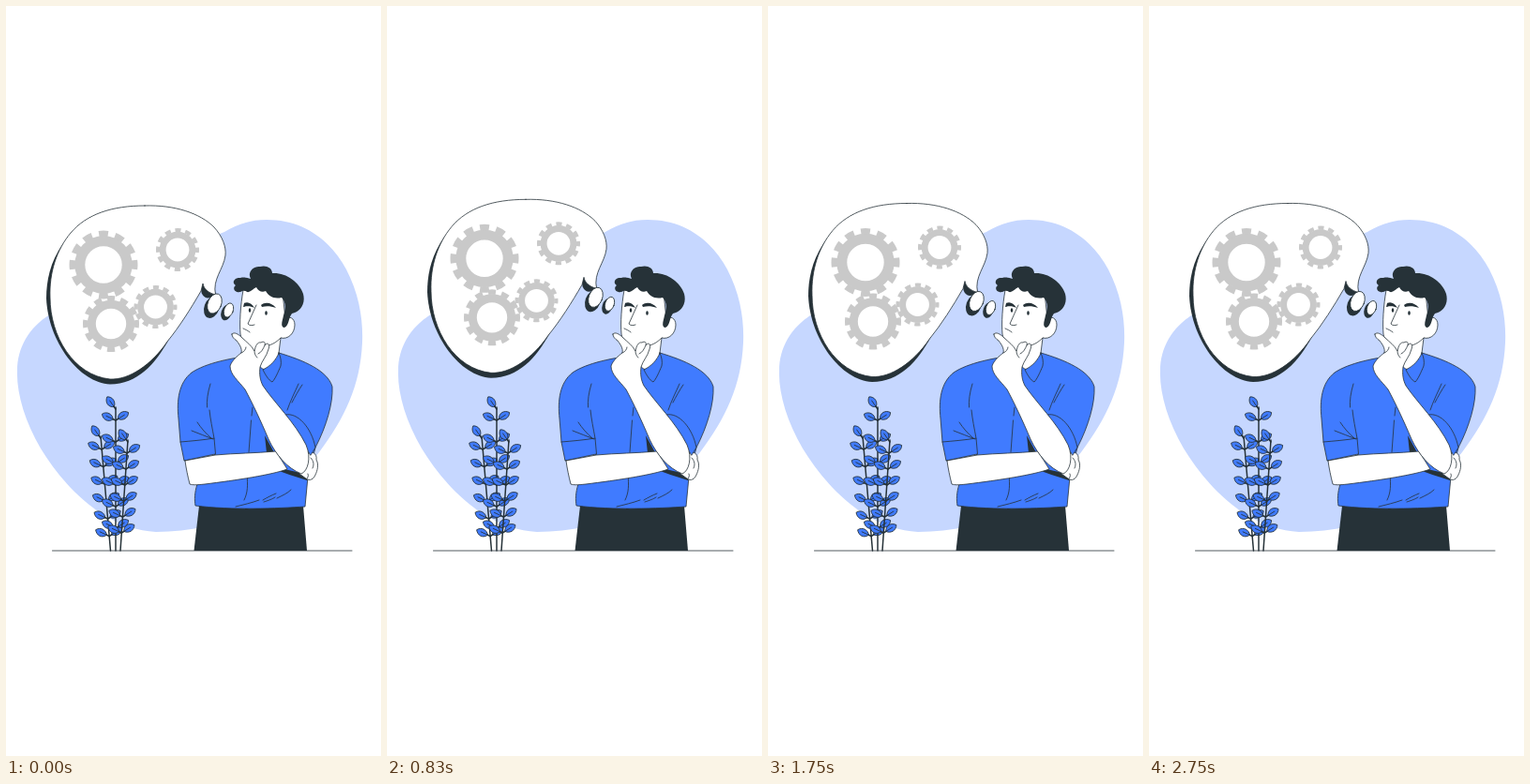
An HTML page for the animation above (2.79 s loop, 400 px wide and 800 px high).

```html
<!DOCTYPE html>
<html lang="en">
<head>
<meta charset="utf-8">
<title>Thinking</title>
<style>
  html, body { margin: 0; width: 100%; height: 100%; overflow: hidden; background: #fff; }
  svg { display: block; width: 100%; height: 100%; }
  .ink { fill: #263238; }
  .white { fill: #fff; }
  .blue { fill: #407bff; }
  .line { fill: none; }
  .white, .blue, .line { stroke: #263238; stroke-width: .8; stroke-linecap: round; stroke-linejoin: round; }
  .stem { stroke-width: 1.5; }
  #gear circle { fill: none; stroke: #c9c9c9; }
</style>
</head>
<body>
<svg viewBox="0 0 400 800">
  <defs>
    <g id="gear">
      <circle r="69" stroke-width="30"/>
      <circle r="91" stroke-width="18" pathLength="360" stroke-dasharray="17 13" stroke-dashoffset="8.5"/>
    </g>
  </defs>

  <path fill="#c6d7ff" d="M278 228C318 228 346 250 363 281C377 308 381 335 380 359C378 405 361 440 334 476C295 525 240 561 160 561C105 558 62 513 37 472C20 443 11 412 12 389C12 365 24 343 47 329C110 290 180 262 233 241C248 232 262 228 278 228Z"/>
  <path class="line" stroke-width="1" d="M49.500 581H369"/>
  <g id="plant"></g>

  <g id="thought">
    <path class="ink" d="M66 247C48 268 43 291 43 312C45 358 78 402 111 403.500C140 403 159 383 174 355L120 300Z"/>
    <path class="ink" d="M210 296C206 303 209 311 215 311.500C219 311.500 222 310 224 308L220 296Z"/>
    <path class="white" d="M148 213C180 212 207 221 222 236C231 246 235 257 234 266C232 281 220 291 223.500 308C216 306 211 302 210 296L208 304C197 323 185 342 172 358C155 383 131 399 111 398C72 394 47 352 47 311C46 284 54 260 69 242C86 222 113 213 148 213Z"/>
    <use href="#gear" transform="translate(104 276) scale(.365)"/>
    <use href="#gear" transform="translate(112 339) scale(.3)"/>
    <use href="#gear" transform="translate(159.500 321) scale(.23)"/>
    <use href="#gear" transform="translate(183 260) scale(.23)"/>
    <ellipse class="ink" cx="219.500" cy="321.500" rx="8" ry="11.800" transform="rotate(20 219.500 321.500)"/>
    <ellipse class="white" cx="222.500" cy="317.500" rx="7.200" ry="11" transform="rotate(22 222.500 317.500)"/>
    <ellipse class="ink" cx="235" cy="327" rx="5.400" ry="8.600" transform="rotate(18 235 327)"/>
    <ellipse class="white" cx="237.500" cy="324.500" rx="4.800" ry="7.800" transform="rotate(20 237.500 324.500)"/>
  </g>

  <g id="man">
    <path class="ink" d="M206 533L200.500 581H321L317 533Z"/>
    <path class="blue" d="M270 372C240 375 213 381 198 391C184 402 182 421 184 440L186 465L190 485L223 478L204 510C201 519 201 527 202 533C240 538 290 536 319 534L322 502L330 471C342 448 349 423 348 406C343 389 318 378 291 370Z"/>
    <path class="line" d="M186 465C198 464 210 463 222 461L223.500 478M222 461C220 450 218 441 217 431M218 403C215 413 214 421 214.500 428M198 453C206 456 213 459 221 462M204 444C208 450 213 456 219 461M263 428L262 437M261.500 442L259 476M257 500C258 511 258 519 254 527M245 534C253 532 262 530 270 527M274 527C279 524 283 522 288 520M275 529C281 527 284 526 287 524M289 525C295 522 300 520 304 516"/>

    <path class="white" d="M253 303C250 320 249 338 250 350C253 364 266 371 270 368L268 378C271 388 275 388 278 387C287 382 291 376 291 370L293 354C301 356 308 349 308 340C308 333 302 330 298 334L294 296H262Z"/>
    <path class="line" d="M293 354C288 359 284 361 280 362"/>
    <path class="ink" d="M250 305C244 306 241 301 245 298C240 295 244 289 250 290C254 289 257 290 261 291C257 284 264 277 271 278C277 276 284 279 284 285C298 284 313 294 317 307C320 319 313 326 305 328C301 333 302 341 297 343C292 342 295 336 296 330C299 321 298 315 294 311C285 313 280 309 277 304C273 306 269 304 267 300C263 302 260 306 257 305C254 303 253 304 250 305Z"/>
    <path class="ink" d="M254 317C258 315 262 317 265 322C261 320 257 320 253 321ZM272 319C277 315 284 317 288 322C282 320 278 320 273 321Z"/>
    <ellipse class="ink" cx="260" cy="324.500" rx="1.200" ry="2.200"/>
    <ellipse class="ink" cx="277.500" cy="327.500" rx="1.300" ry="2.300"/>
    <path class="line" d="M267 319L258 339C260 341 262 341 265 340M253 344C255 345 258 346 260 348"/>

    <path class="blue" d="M291 370C293 374 294 380 293 384C290 391 287 398 284 401C280 399 277 394 274 388C282 384 288 378 291 370Z"/>
    <path class="line" d="M316 404C312 410 308 417 305 423M312 403C308 412 303 422 300 431"/>

    <path class="ink" d="M276 458L287 478L278 477ZM284 491L323 500L321 506C309 502 296 498 283 493Z"/>
    <path class="white" d="M191 485L223 479C245 477 266 477 288 475L300 494C284 500 245 506 212 510C203 511 199 511 196 510C194 502 192 493 191 485Z"/>
    <path class="white" d="M322 477C327 475 332 477 331 484C334 489 332 496 330 500C328 505 324 507 320 504L313 499Z"/>
    <path class="line" d="M325 482C328 485 329 489 327 493M322 499C323 501 322 503 321 504"/>
    <path class="blue" d="M298 436C311 433 326 450 330 471L325 479Z"/>
    <path class="white" d="M241 350C243 347 248 350 252 354C256 358 262 362 265 368C266 363 268 358 272 359C275 357 277 359 276 362C279 358 282 361 280 366C278 374 273 378 271 385C270 393 271 399 274 405C287 424 308 444 320 468C326 482 322 496 315 499C300 493 288 479 280 462C272 443 263 424 255 409C248 400 239 393 239 384C241 378 247 373 251 370C252 365 249 361 246 357C243 355 241 353 241 350Z"/>
    <path class="line" d="M265 368C265 371 266 373 268 375M276 362C274 366 273 369 269 371M251 370C254 369 256 366 256 364"/>
  </g>
</svg>
<script>
const plant = document.getElementById('plant');
const thought = document.getElementById('thought');

function addPath(d, className, transform = '') {
  const path = document.createElementNS('http://www.w3.org/2000/svg', 'path');
  path.setAttribute('d', d);
  path.setAttribute('class', className);
  path.setAttribute('transform', transform);
  plant.append(path);
}

function growLeaf(x, y, tilt) {
  const transform = `translate(${x} ${y}) rotate(${tilt})`;
  addPath('M0 0L4 0', 'line stem', transform);
  addPath('M3 0C6-6 13-5 16 0C13 5 6 5 3 0ZM3 0H11', 'blue', transform);
}

// A straight stem with a pair of leaves at even steps and one leaf at the tip.
function growStem(baseX, tipX, tipY, gap) {
  const baseY = 581, pairs = 6;
  addPath(`M${baseX} ${baseY}L${tipX} ${tipY}`, 'line stem');
  growLeaf(tipX, tipY + 2, -125);
  for (let i = 0; i < pairs; i++) {
    const y = tipY + 14 + i * gap;
    const x = tipX + (baseX - tipX) * (y - tipY) / (baseY - tipY);
    growLeaf(x, y, -155);
    growLeaf(x, y, -32);
  }
}
growStem(111.5, 101, 459, 18.5);
growStem(117, 117, 428, 23);
growStem(122, 130, 463, 17);

// The thought floats up and down at 24 steps per second, then the loop restarts.
const loop = 2790, period = 1500, rise = 7.5, stepTime = 1000 / 24;
const start = performance.now();
function draw(now) {
  const time = Math.max(0, now - start) % loop;
  const step = Math.min(66, Math.floor((time + 3.4) / stepTime));
  const phase = step * stepTime / period % 1;
  const lift = rise * (1 - Math.abs(1 - 2 * phase));
  thought.setAttribute('transform', `translate(0 ${(-lift).toFixed(2)})`);
  requestAnimationFrame(draw);
}
draw(start);
</script>
</body>
</html>
```
